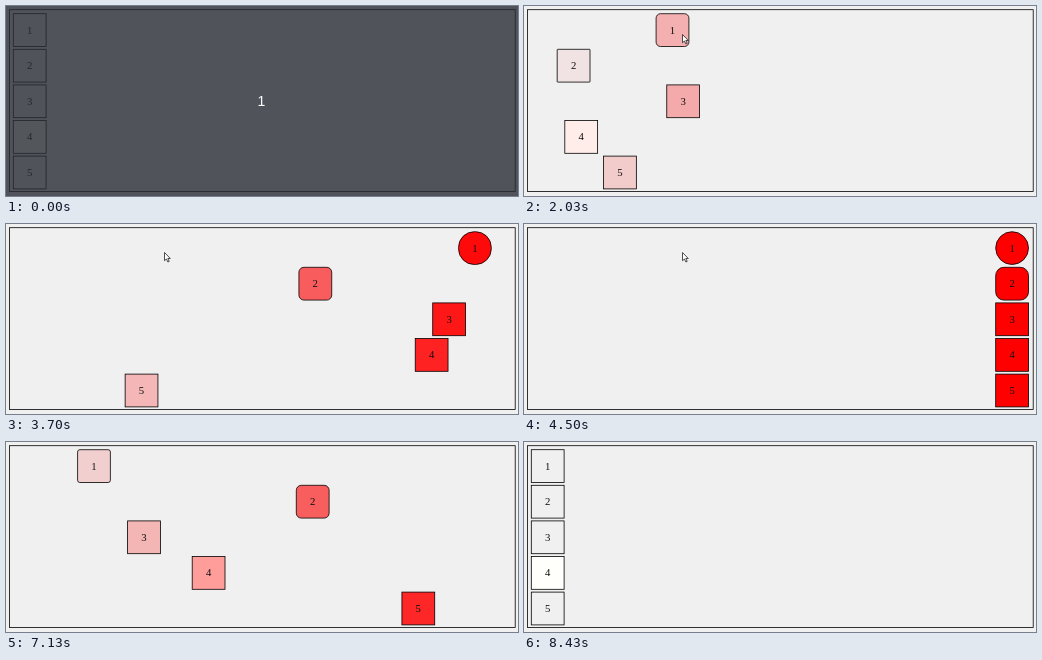
Write an HTML page that moves like this. It is 512 by 190 pixels and loops after 9.36 s.

```html
<!DOCTYPE html>
<html lang="en">
<head>
<meta charset="utf-8">
<title>Easing comparison</title>
<style>
  html, body { margin: 0; width: 100%; height: 100%; overflow: hidden; background: #f0f0f0; }
  svg { display: block; width: 512px; height: 190px; }
  rect { stroke: #000; stroke-width: .8; }
  text { text-anchor: middle; font: 10.75px "Liberation Serif", serif; fill: #111; }
  #countdown text { font: 14px "Liberation Sans", sans-serif; fill: #fff; }
</style>
</head>
<body>
<svg viewBox="0 0 512 190">
  <rect x="3.4" y="3.7" width="505.8" height="181.9" fill="none"/>
  <g id="boxes"></g>
  <path id="pointer" d="M158.5 28.5v8.2l1.9-1.7 1.5 3 1.3-.6-1.4-2.9h2.5z"
        fill="#fff" stroke="#222" stroke-width=".8"/>
  <g id="countdown">
    <rect width="512" height="190" fill="#282c34" fill-opacity=".8" style="stroke:none"/>
    <text x="255.5" y="100">1</text>
  </g>
</svg>
<script>
const LOOP = 9360, COUNTDOWN_END = 30, DURATION = 3000;
const ENTER = 1466, LEAVE = 5400, RETURN = 5429;
const LEFT = 7.3, TOP = 7.7, SIZE = 32.8, PITCH = 35.6, TRAVEL = 464.4;
const GREY = [240, 240, 240], IVORY = [255, 255, 252], RED = [255, 0, 0];

const boxes = [
  { curve: [.25, .1, .25, 1], radius: SIZE / 2 },
  { curve: [.42, 0, 1, 1], radius: SIZE / 4 },
  { curve: [0, 0, .58, 1] },
  { curve: [.42, 0, .58, 1], rest: IVORY },
  { curve: [.7, .7, .55, -.63] }
];

const bezier = (a, b, s) => 3 * a * s * (1 - s) ** 2 + 3 * b * s * s * (1 - s) + s ** 3;

function ease([x1, y1, x2, y2], t) {
  if (t <= 0 || t >= 1) return t <= 0 ? 0 : 1;
  let low = 0, high = 1;
  for (let i = 0; i < 30; i++) {
    const mid = (low + high) / 2;
    if (bezier(x1, x2, mid) < t) low = mid; else high = mid;
  }
  return bezier(y1, y2, low);
}

const byId = id => document.getElementById(id);

function add(parent, tag, attributes) {
  const node = document.createElementNS("http://www.w3.org/2000/svg", tag);
  for (const name in attributes) node.setAttribute(name, attributes[name]);
  return parent.appendChild(node);
}

boxes.forEach((box, i) => {
  const y = TOP + i * PITCH;
  box.group = add(byId("boxes"), "g", {});
  box.shape = add(box.group, "rect", { x: LEFT, y, width: SIZE, height: SIZE });
  add(box.group, "text", { x: LEFT + SIZE / 2, y: y + 19.8 }).textContent = i + 1;
});

function draw(time) {
  for (const { curve, radius = 0, rest = GREY, group, shape } of boxes) {
    const p = time < RETURN
      ? ease(curve, (time - ENTER) / DURATION)
      : 1 - ease(curve, (time - RETURN) / DURATION);
    const color = rest.map((c, k) => Math.round(c + (RED[k] - c) * p));
    group.setAttribute("transform", `translate(${TRAVEL * p})`);
    shape.setAttribute("rx", radius * p);
    shape.setAttribute("fill", `rgb(${color})`);
  }
  const show = (id, on) => byId(id).style.display = on ? "" : "none";
  show("pointer", time >= ENTER && time < LEAVE);
  show("countdown", time < COUNTDOWN_END);
}

const start = performance.now();
function frame() {
  draw((performance.now() - start) % LOOP);
  requestAnimationFrame(frame);
}
frame();
</script>
</body>
</html>
```
